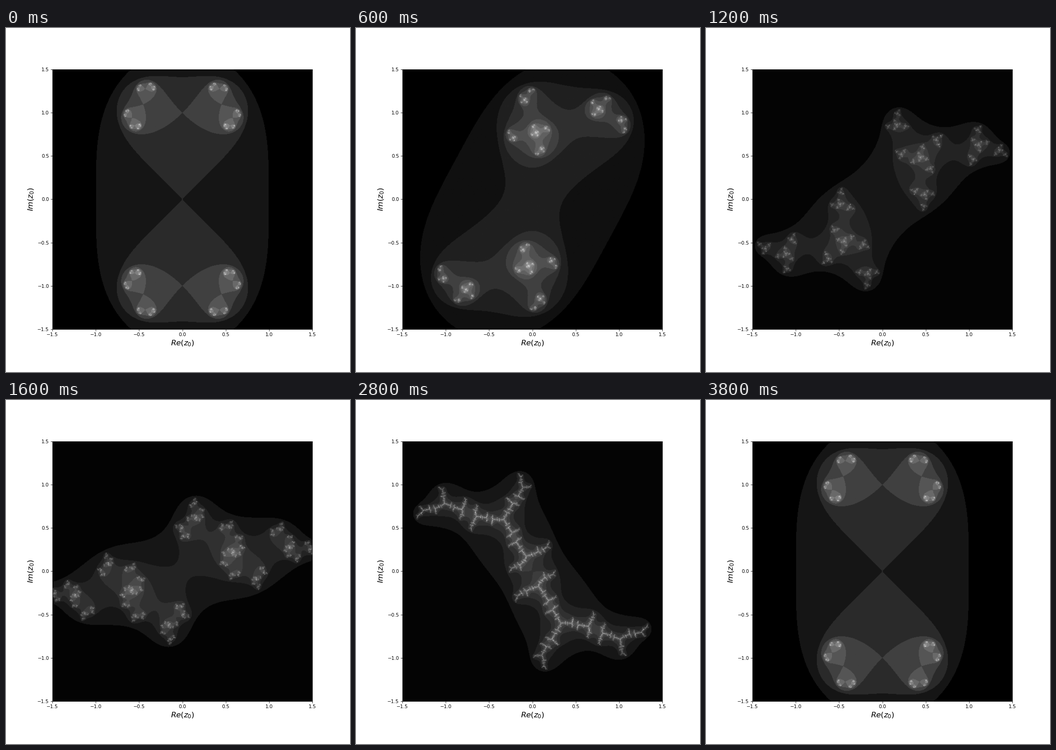
Recreate the animation shown at these times as a matplotlib script. Size 748x748 px, loop 4 s.

```python
import numpy as np
import matplotlib.pyplot as plt
from matplotlib.animation import FuncAnimation

SIZE, DPI = 748, 74.8
FRAMES, INTERVAL = 20, 200
GRID, LIMIT = 500, 1.5

# Escape count shown as white, by distance from either end of the loop
TOPS = [12, 13, 15, 16, 24, 39, 39, 39, 39, 39]

axis = np.linspace(-LIMIT, LIMIT, GRID)
PLANE = (axis[None, :] + 1j * axis[:, None]).ravel()


def escape_counts(c, top):
    """Number of steps each point of the plane stays within radius 2."""
    counts = np.full(PLANE.size, top)
    alive = np.arange(PLANE.size)
    z = PLANE.copy()
    for n in range(top):
        z = z * z + c
        out = z.real ** 2 + z.imag ** 2 > 4
        counts[alive[out]] = n
        alive, z = alive[~out], z[~out]
    return counts


def shade(counts, top):
    """Grey levels; finely stepped pictures share one tone per pair."""
    if top < 20:
        band = counts
    elif top < 30:
        band = counts // 2
    else:
        band = np.maximum(counts - 1, 0) // 2
    total = np.bincount(band, weights=counts)
    tone = total / np.maximum(np.bincount(band), 1)
    return (tone[band] * 255 / top).reshape(GRID, GRID)


def picture(i):
    top = TOPS[min(i, FRAMES - 1 - i)]
    c = np.exp(-2j * np.pi * i / (FRAMES - 1))
    return shade(escape_counts(c, top), top)


fig = plt.figure(figsize=(SIZE / DPI, SIZE / DPI), dpi=DPI, facecolor="white")
ax = fig.add_axes([101 / SIZE, 1 - 655 / SIZE, 565 / SIZE, 565 / SIZE])
image = ax.imshow(picture(0), cmap="gray", vmin=0, vmax=255, origin="lower",
                  extent=[-LIMIT, LIMIT, -LIMIT, LIMIT])
ticks = np.arange(-1.5, 1.6, 0.5)
ax.set_xticks(ticks)
ax.set_yticks(ticks)
ax.set_xlabel("$Re(z_0)$", fontsize=16)
ax.set_ylabel("$Im(z_0)$", fontsize=16)


def update(i):
    image.set_data(picture(i))
    return [image]


anim = FuncAnimation(fig, update, frames=FRAMES, interval=INTERVAL, repeat=True)
plt.show()
```
